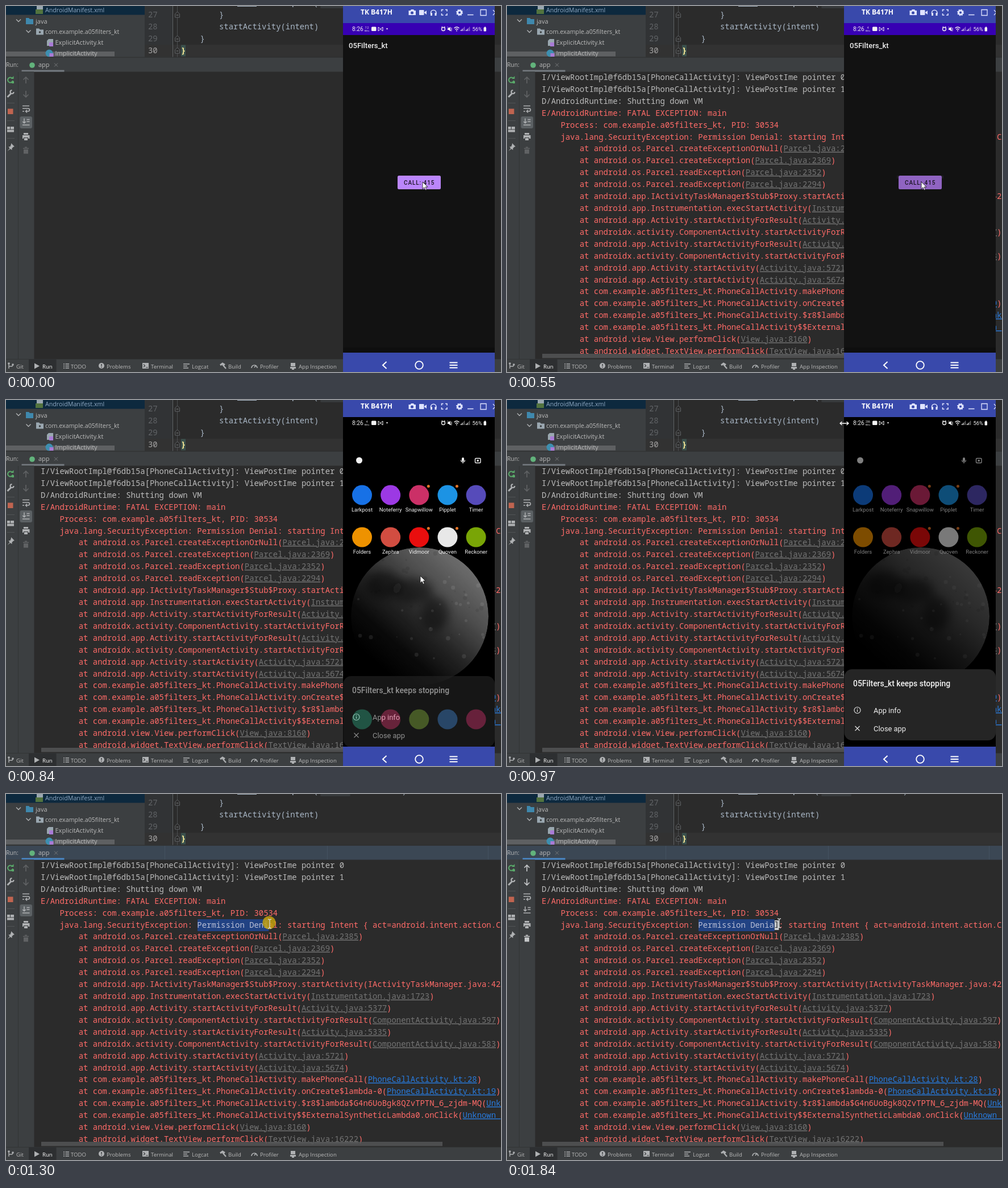
These frames come from a looping animation (871x643 px, 1.91 s). An HTML page:

```html
<!DOCTYPE html>
<html lang="en">
<head>
<meta charset="utf-8">
<title>Permission denial demo</title>
<style>
html, body { margin: 0; width: 100%; height: 100%; overflow: hidden; background: #2b2b2b; }
svg { display: block; width: 871px; height: 643px; }
text { white-space: pre; font-family: "Open Sans", "Noto Sans", sans-serif; }
.mono { font-family: "Noto Sans Mono", "DejaVu Sans Mono", monospace; font-size: 13.92px; }
.phone text { font-family: Roboto, sans-serif; }
.phone .title { font-family: "Open Sans", sans-serif; }
.link { fill: #747474; text-decoration: underline; }
.file { fill: #287bde; text-decoration: underline; }
</style>
</head>
<body>
<svg id="stage" viewBox="0 0 871 643"></svg>
<script>
const LOOP = 1910, CHAR = 8.352, LINE = 20.913, SEL_X = 337;

const rect = (x, y, w, h, fill, more = '') =>
  `<rect x="${x}" y="${y}" width="${w}" height="${h}" fill="${fill}" ${more}/>`;
const disc = (x, y, r, fill, more = '') =>
  `<circle cx="${x}" cy="${y}" r="${r}" fill="${fill}" ${more}/>`;
const line = (d, stroke, w = 1.4, more = '') =>
  `<path d="${d}" fill="none" stroke="${stroke}" stroke-width="${w}" ${more}/>`;
const shape = (d, fill, more = '') => `<path d="${d}" fill="${fill}" ${more}/>`;
const label = (x, y, s, size, fill, more = '') =>
  `<text x="${x}" y="${y}" font-size="${size}" fill="${fill}" ${more}>${s}</text>`;
const mono = (x, y, s, fill, more = '') =>
  `<text class="mono" x="${x}" y="${Math.round(y)}" fill="${fill}" ${more}>${s}</text>`;
const group = (id, body, more = '') => `<g id="${id}" ${more}>${body}</g>`;

const ICON = '#afb1b3', DIM = '#606264', PANEL = '#3c3f41', TEXT = '#bbbbbb';

function projectTree() {
  return rect(0, 0, 244, 90, PANEL) + rect(0, 0, 244, 15.5, '#0d293e')
    + rect(54, 0, 11, 7, '#9aa7b0') + rect(52, 6, 13, 8, '#52733f')
    + label(69, 11, 'AndroidManifest.xml', 10.7, '#8fa9c4')
    + line('M18 23.5l4 4 4-4M35.5 42.5l4 4 4-4', ICON)
    + shape('M35 21h5l2 2h6v9H35z', '#3f88ad')
    + label(52, 30.5, 'java', 11, TEXT)
    + shape('M53 39.5h5l2 2h6v9H53z', '#9aa7b0') + disc(59.5, 46, 1.7, PANEL)
    + label(69, 49, 'com.example.a05filters_kt', 10.7, TEXT)
    + shape('M75 58h8v12h-11v-9z', '#9aa7b0') + rect(76, 64, 7, 7, '#a97bd6')
    + label(86.5, 68, 'ExplicitActivity.kt', 11, TEXT)
    + rect(0, 80, 191, 8.5, '#5e6062')
    + disc(76, 83, 6.5, '#3e8fb0') + rect(76.5, 83, 7, 6, '#a97bd6')
    + label(86.5, 87, 'ImplicitActivity', 11, TEXT);
}

function editor() {
  const fold = y => shape(`M297.5 ${y + 5}v-6l4-4 4 4v6z`, '#2b2b2b', 'stroke="#606366"')
    + line(`M299.5 ${y + 1}h4`, '#808385', 1);
  const numbers = [27, 28, 29, 30].map((n, i) =>
    mono(250, 20 + i * LINE, n, n === 30 ? '#a4a3a3' : '#606366')).join('');
  return rect(244, 0, 627, 90, '#2b2b2b') + rect(244, 0, 49, 90, '#313335')
    + rect(244, 68, 627, 21, '#323232')
    + line('M293.5 0V90', '#5f6264', 1) + line('M301.5 0V90', '#4b4e50', 1)
    + rect(407, 0, 34, 1, '#a9b7c6') + rect(504, 0, 1.5, 2, '#a9b7c6')
    + rect(553, 0, 53, 4, '#373a3c', 'rx="2"') + line('M545 0q0 2 2 2M699 2q2 0 2-2', '#a9b7c6', 1)
    + numbers + fold(15) + fold(57) + fold(78)
    + rect(308, 68.5, 8, 20, '#3b514d')
    + mono(375, 20, '}', '#a9b7c6') + mono(375, 41, 'startActivity(intent)', '#a9b7c6')
    + mono(341.5, 62, '}', '#a9b7c6')
    + mono(308, 83, '}', '#ffef9a', 'font-weight="700"');
}

function runHeader() {
  return rect(0, 89.5, 871, 1.5, '#323435') + rect(0, 91, 871, 24.5, PANEL, 'id="head"')
    + group('headLines', line('M279.5 91v24M565.5 91v24M848.5 91v24', '#445260', 1))
    + label(0, 107, 'Run:', 10.3, TEXT) + disc(46, 104, 4.8, '#62b37c')
    + label(57, 107, 'app', 11, TEXT)
    + line('M85 100.5l6 6M91 100.5l-6 6', '#77797b', 1)
    + rect(27.5, 112.5, 75, 3, '#747a80', 'id="tabLine"');
}

function runTools() {
  const trash = 'M30 249.5h10v1.6H30zM33 247.5h4v1.5h-4zM31 252h8v7.5h-8z';
  return rect(0, 115, 49, 505, PANEL) + line('M21.5 116V620M49.5 116V620', '#323435', 1)
    + line('M11 127a4.5 4.5 0 1 0 1 4', '#59a869', 2) + shape('M8.5 128h5v-5z', '#59a869')
    + rect(10, 132, 4, 4, '#59a869')
    + line('M2.5 160l6-6', ICON, 3) + line('M13.5 151a3 3 0 1 1-3-3', ICON, 2.2)
    + rect(3, 180.5, 9.5, 9.5, '#c06450') + line('M2 170.5h13M2 201.5h13M2 232.5h13', '#515456', 1)
    + rect(2, 212, 5, 4.5, ICON) + rect(8, 212, 6, 4.5, ICON) + rect(2, 217.5, 12, 4, ICON)
    + shape('M9 241l6 6-2 .5-2.5 2.5v3l-3-2-5 4 4-5-2-3h3L9 243z', ICON)
    + group('nav', line('M35 136v-11M30.5 129.5l4.5-4.5 4.5 4.5M35 149v11M30.5 155.5l4.5 4.5 4.5-4.5', 'currentColor', 1.7)
      + shape(trash, 'currentColor'))
    + line('M29 175.5h12M29 180h9.5q3 0 3 2.5t-3 2.5H35M37 182.5l-2.5 2.5 2.5 2.5M29 185h3', ICON, 1.5)
    + rect(24.5, 194, 21.5, 21, '#5c6164', 'id="pin" rx="3"')
    + line('M36.5 199.5h5M36.5 203h5M29 209h12.5M32 197.5v8M29.2 203l2.8 2.8 2.8-2.8', ICON, 1.5)
    + shape('M31 223h8v3h-8zM29 227h12.5v6H39v-2h-8v2h-2zM32 232h6v4h-6z', ICON);
}

function statusBar() {
  const tabs = [[18, 'Git'], [64, 'Run'], [114, 'TODO'], [177, 'Problems'], [255, 'Terminal'],
    [327, 'Logcat'], [391, 'Build'], [447, 'Profiler'], [515, 'App Inspection']];
  return rect(0, 620, 871, 23, PANEL) + line('M0 620.5H871', '#323435', 1)
    + rect(40, 621, 48.5, 22, '#2d2f31')
    + line('M5 627v10M5 633h5q2 0 2-3', ICON) + disc(5, 628, 1.8, ICON) + disc(12, 630, 1.8, ICON)
    + shape('M50 627.5l9 5-9 5z', ICON)
    + line('M101 629h2M104.5 629H111M101 632.5h2M104.5 632.5H111M101 636h2M104.5 636H111', ICON)
    + disc(168, 632, 5, ICON) + line('M168 629v3.5M168 633.8v1.5', PANEL, 1.6)
    + rect(240, 627, 11, 10, ICON) + line('M242 629.5l2.5 2.5-2.5 2.5M246 635h4', PANEL, 1.2)
    + line('M312 629h11M312 632.5h7M312 636h9', ICON, 1.6)
    + line('M377 631l4-3 4 2.5', ICON, 3) + line('M381 630l6 7', ICON, 2.2)
    + line('M432 636a5 5 0 1 1 10 0M437 635l3-4', ICON, 1.7)
    + shape('M501 627h8v6h-8zM500 634h10v3h-10z', ICON) + rect(503, 637, 4, 2, ICON)
    + tabs.map(([x, s]) => label(x, 637, s, 9.6, s === 'Run' ? '#ffffff' : TEXT)).join('');
}

const PKG = 'com.example.a05filters_kt';
const ROOT = 'I/ViewRootImpl@f6db15a[PhoneCallActivity]: ViewPostIme pointer ';
// |grey link|  ^blue link^
const STACK = `android.os.Parcel.createExceptionOrNull(|Parcel.java:2385|)
android.os.Parcel.createException(|Parcel.java:2369|)
android.os.Parcel.readException(|Parcel.java:2352|)
android.os.Parcel.readException(|Parcel.java:2294|)
android.app.IActivityTaskManager$Stub$Proxy.startActivity(IActivityTaskManager.java:42
android.app.Instrumentation.execStartActivity(|Instrumentation.java:1723|)
android.app.Activity.startActivityForResult(|Activity.java:5377|)
androidx.activity.ComponentActivity.startActivityForResult(|ComponentActivity.java:597|)
android.app.Activity.startActivityForResult(|Activity.java:5335|)
androidx.activity.ComponentActivity.startActivityForResult(|ComponentActivity.java:583|)
android.app.Activity.startActivity(|Activity.java:5721|)
android.app.Activity.startActivity(|Activity.java:5674|)
${PKG}.PhoneCallActivity.makePhoneCall(^PhoneCallActivity.kt:28^)
${PKG}.PhoneCallActivity.onCreate$lambda-0(^PhoneCallActivity.kt:19^)
${PKG}.PhoneCallActivity.$r8$lambda$G4n6UoBgk8QZvTPTN_6_zjdm-MQ(^Unknown^
${PKG}.PhoneCallActivity$$ExternalSyntheticLambda0.onClick(^Unknown ^
android.view.View.performClick(|View.java:8160|)
android.widget.TextView.performClick(|TextView.java:16222|)`.split('\n');

function consoleLog() {
  const denial = '    java.lang.SecurityException: <tspan id="picked" fill="#b9bfd6"></tspan>'
    + '<tspan id="rest"></tspan>: starting Intent { act=android.intent.action.CALL';
  const lines = [ROOT + 0, ROOT + 1, 'D/AndroidRuntime: Shutting down VM',
    'E/AndroidRuntime: FATAL EXCEPTION: main', `    Process: ${PKG}, PID: 30534`, denial,
    ...STACK.map(s => '        at ' + s
      .replace(/\|(.*)\|/, '<tspan class="link">$1</tspan>')
      .replace(/\^(.*)\^/, '<tspan class="file">$1</tspan>'))];
  return rect(SEL_X, 220, 0, 21, '#214283', 'id="sel"')
    + lines.map((s, i) => mono(61, 130 + i * LINE, s, i < 3 ? '#bbbbbb' : '#ff6b68')).join('')
    + rect(62, 611, 706, 7.5, '#555758', 'opacity=".8"')
    + group('caret', rect(470.8, 222, 7.6, 17, '#c9ccd0') + mono(470.6, 235, 'l', '#2b2b2b'));
}

function phoneFrame() {
  const W = '#ffffff', P = '#dfe3ff';
  return rect(593, 0, 267, 30, '#3949ab') + rect(593, 609, 267, 34, '#3949ab')
    + label(624, 15, 'TK B417H', 12, W, 'class="title" font-weight="700"')
    + shape('M708.5 8h3l1.5-2h4l1.5 2h2.5v8h-12.5z', P) + disc(714.5, 12, 2.5, '#3949ab')
    + rect(727, 7, 8.5, 9, P, 'rx="1"') + shape('M736 11l4-3v7l-4-3z', P)
    + line('M747.5 14v-2a4.7 4.7 0 0 1 9.4 0v2', P, 1.6) + rect(747, 12, 3, 5, P) + rect(754.5, 12, 3, 5, P)
    + line('M766.5 9.5v-3h3M773 6.5h3v3M776 13v3h-3M769.5 16h-3v-3', P, 1.6)
    + disc(798, 11.5, 3.5, 'none', `stroke="${P}" stroke-width="3"`)
    + disc(798, 11.5, 5.2, 'none', `stroke="${P}" stroke-width="1.6" stroke-dasharray="2 2.08"`)
    + line('M812 15.5h10.5M835 6.5h10v10h-10zM857 7l4 4.5-4 4.5', P, 1.3)
    + line('M669.5 625l-6.5 6 6.5 6', W, 2) + disc(727, 631, 6.8, 'none', `stroke="${W}" stroke-width="1.8"`)
    + line('M780.5 626.5h14M780.5 631h14M780.5 635.5h14', W, 1.9);
}

function phoneStatus() {
  const W = '#f2f2f2', bars = x => [0, 1, 2, 3].map(i =>
    rect(x + i * 2, 42 - i * 1.8, 1.2, 2 + i * 1.8, W, i > 1 ? 'opacity=".5"' : '')).join('');
  return label(609, 44, '8:26', 10.2, W)
    + label(635, 40, '', 4.8, W, 'id="rate" text-anchor="middle"')
    + label(635, 44.5, 'KB/s', 4, W, 'text-anchor="middle"')
    + rect(643, 36.5, 8.5, 7.5, W, 'rx="1.5"')
    + line('M655 37v7l4-3.5 4 3.5v-7l-4 3.5z', W, 1) + disc(670.5, 40, 1.2, W)
    + disc(769.5, 40.5, 3, 'none', `stroke="${W}" stroke-width="1.3"`) + line('M766 37.5l2-1.5M773 37.5l-2-1.5', W, 1)
    + shape('M777 39h2l3-2.5v8l-3-2.5h-2z', W) + line('M777 36.5l7 8M784 38v5', W, 1)
    + line('M788.5 39q4.5-4 9 0M790.5 41.5q2.5-2.5 5 0', W, 1.2) + disc(793, 43.5, 1, W)
    + bars(800) + bars(809)
    + label(820.5, 44, '56%', 9.3, W) + rect(840.5, 37.5, 4.5, 7, W, 'rx="1"') + rect(842, 36.5, 2, 1.5, W);
}

function moon() {
  const blob = (x, y, a, b) => `<ellipse cx="${x}" cy="${y}" rx="${a}" ry="${b}" fill="#0c0c0c" opacity=".45"/>`;
  let seed = 11;
  const random = () => (seed = seed * 16807 % 2147483647) / 2147483647;
  const craters = Array.from({ length: 60 }, () =>
    disc(620 + random() * 220, 265 + random() * 190, 1 + random() * 3,
      random() < .5 ? '#fff' : '#000', 'opacity=".09"')).join('');
  return `<g clip-path="url(#disk)">${disc(728, 380, 121, 'url(#moon)')}
    <g filter="url(#soft)">${blob(665, 325, 32, 24) + blob(715, 335, 36, 22) + blob(755, 375, 24, 30)}</g>
    ${craters}</g>`;
}

function homeScreen() {
  const apps = [['Larkpost', '#1877f2'], ['Noteferry', '#a43cf0'], ['Snapwillow', '#d6336c'],
    ['Pipplet', '#1d9bf0'], ['Timer', '#5b4fc4'], ['Folders', '#fb9a00'], ['Zephra', '#dd5144'],
    ['Vidmoor', '#f50f0f'], ['Quoven', '#f4f4f4'], ['Reckoner', '#7fae06']];
  const X = i => 626.5 + (i % 5) * 50.15;
  const grid = apps.map(([name, fill], i) => {
    const y = 167 + (i / 5 | 0) * 74;
    return disc(X(i), y, 17.5, fill)
      + ([2, 3, 7, 8].includes(i) ? disc(X(i) + 16.5, y - 15.5, 2.5, '#f07a2a') : '')
      + label(X(i), y + 29, name, 9.5, '#ffffff', 'text-anchor="middle"');
  }).join('');
  const dock = ['#1fa37a', '#d8245f', '#7fb32a', '#2f7fd6', '#d81f63']
    .map((fill, i) => disc(X(i), 561, 17.5, fill)).join('');
  return rect(593, 30, 267, 579, '#000') + moon()
    + disc(621.5, 106, 5.5, '#ffffff')
    + rect(802, 101, 4, 7, '#fff', 'rx="2"') + line('M800.5 105.5a3.5 3.5 0 0 0 7 0M804 109v2.5', '#fff', 1.2)
    + rect(825.5, 102.5, 9.5, 8, 'none', 'stroke="#fff" stroke-width="1.4" rx="1.5"') + disc(830.2, 106.5, 1.8, '#fff')
    + grid + dock;
}

function appScreen() {
  return rect(593, 30, 267, 579, '#121212') + rect(593, 30, 267, 21, '#3700b3')
    + rect(593, 600, 267, 9, '#0e0e0e')
    + label(603, 73.5, '05Filters_kt', 13.1, '#ececec', 'font-weight="500"')
    + rect(686, 298, 82, 5, '#1f1d23', 'id="lift"')
    + rect(689, 298, 76, 24, '#bb86fc', 'id="button" rx="2.5"')
    + label(700, 314, 'CALL: 415', 10, '#1a1422', 'font-weight="500" letter-spacing=".9"');
}

function dialog() {
  return rect(593.5, 473, 266.5, 125, '#252525', 'rx="14"')
    + label(609, 503, '05Filters_kt keeps stopping', 13.9, '#f3f3f3', 'font-weight="500"')
    + disc(616.5, 545, 5.5, 'none', 'stroke="#e0e0e0" stroke-width="1.2"')
    + line('M616.5 544v4M616.5 541.5v1.5', '#e0e0e0', 1.2)
    + label(645, 549.5, 'App info', 12.9, '#f0f0f0')
    + line('M612.5 573l8 8M620.5 573l-8 8', '#e0e0e0', 1.2)
    + label(645, 582, 'Close app', 12.9, '#f0f0f0');
}

const POINTERS = {
  arrow: shape('M0 0v12.5l3-2.8 2.2 4.8 2-.9-2.1-4.7h4.1z', '#fff', 'stroke="#111" stroke-width=".8"'),
  resize: line('M-7 0H7M-4-3l-3.5 3 3.5 3M4-3l3.5 3-3.5 3', '#fff', 1.3),
  beam: line('M-3-8q3 0 3 2V6q0 2-3 2M3-8Q0-8 0-6V6q0 2 3 2', '#d6d6d6', 1.3)
};

stage.innerHTML = `<defs>
  <linearGradient id="moon" x1=".85" y1=".12" x2=".2" y2=".85">
    <stop offset="0" stop-color="#747474"/><stop offset=".3" stop-color="#505050"/>
    <stop offset=".55" stop-color="#282828"/><stop offset=".8" stop-color="#0a0a0a"/>
    <stop offset="1" stop-color="#000"/></linearGradient>
  <filter id="soft"><feGaussianBlur stdDeviation="8"/></filter>
  <clipPath id="disk"><circle cx="728" cy="380" r="121"/></clipPath>
  <clipPath id="screen"><rect x="593" y="0" width="267" height="643"/></clipPath></defs>`
  + rect(0, 0, 871, 643, '#2b2b2b') + projectTree() + editor() + runHeader()
  + group('log', consoleLog()) + runTools() + statusBar()
  + group('phone', homeScreen() + rect(593, 30, 267, 579, '#000', 'id="shade"')
    + group('sheet', dialog()) + group('app', appScreen()) + phoneStatus() + phoneFrame(),
    'class="phone" clip-path="url(#screen)"')
  + disc(0, 226, 11.5, '#c9a50c', 'id="halo" opacity=".82"')
  + Object.entries(POINTERS).map(([k, body]) => group(k, body)).join('');

// Each track holds [start ms, value...] steps.
const TRACKS = {
  pointer: [[0, 'arrow', 733, 309], [70, 'arrow', 732, 309], [140, 'arrow', 730, 309], [200, 'arrow', 729, 309],
    [900, 'arrow', 676, 158], [970, 'resize', 593.5, 41], [1040, 'beam', 340, 230], [1170, 'beam', 338, 229],
    [1240, 'beam', 402, 228], [1300, 'beam', 464, 228], [1370, 'beam', 471, 228],
    [1770, 'beam', 475, 228], [1840, 'beam', 479, 227]],
  rate: [[0, '7.2'], [140, '1.4'], [270, '4'], [900, '206']],
  button: [[0, '#bb86fc'], [480, '#a576df'], [550, '#9064c2'], [620, '#9a6bd0']],
  app: [[0, 1], [690, .45], [770, 0]],
  sheet: [[0, 0, 0], [840, .6, 12], [900, .92, 3], [970, 1, 0]],
  shade: [[0, 0], [840, .05], [900, .35], [970, .5]],
  picked: [[0, 0], [1240, 8], [1300, 15], [1370, 16]]
};
const at = (name, t) => TRACKS[name].findLast(step => step[0] <= t).slice(1);
const el = id => document.getElementById(id);
const set = (id, name, value) => el(id).setAttribute(name, value);
const show = (id, on) => set(id, 'visibility', on ? 'visible' : 'hidden');

function draw(t) {
  const [kind, x, y] = at('pointer', t);
  for (const k in POINTERS) show(k, k === kind);
  set(kind, 'transform', `translate(${x} ${y})`);
  show('halo', t >= 1170 && t < 1510);
  set('halo', 'cx', x - 1);

  el('rate').textContent = at('rate', t)[0];
  set('button', 'fill', at('button', t)[0]);
  show('lift', t >= 480);
  set('app', 'opacity', at('app', t)[0]);
  const [alpha, drop] = at('sheet', t);
  set('sheet', 'opacity', alpha);
  set('sheet', 'transform', `translate(0 ${drop})`);
  set('shade', 'opacity', at('shade', t)[0]);
  set('phone', 'display', t < 1040 ? 'inline' : 'none');

  set('log', 'display', t >= 550 ? 'inline' : 'none');
  const [n] = at('picked', t), words = 'Permission Denial';
  el('picked').textContent = words.slice(0, n);
  el('rest').textContent = words.slice(n);
  set('sel', 'width', n * CHAR);
  set('caret', 'display', n === 16 ? 'inline' : 'none');

  const focus = t >= 1170, ready = t >= 1570;
  set('head', 'fill', focus ? '#3b4754' : PANEL);
  set('headLines', 'display', focus ? 'inline' : 'none');
  set('tabLine', 'fill', focus ? '#4a88c7' : '#747a80');
  set('nav', 'color', ready ? '#c4c6c8' : DIM);
  set('pin', 'opacity', ready ? 0 : 1);
}

const start = performance.now();
function tick() {
  draw((performance.now() - start) % LOOP);
  requestAnimationFrame(tick);
}
tick();
</script>
</body>
</html>
```
